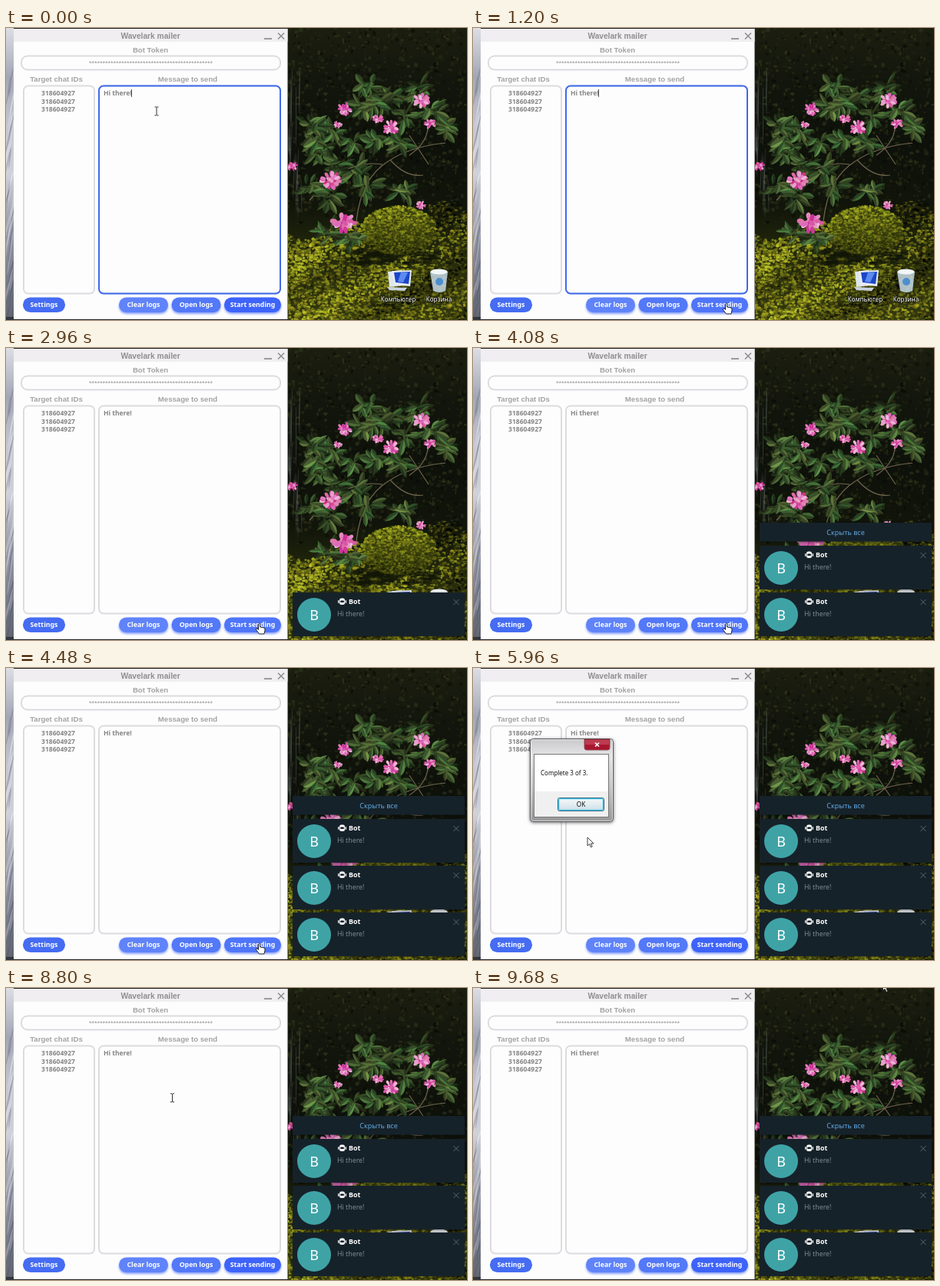
An HTML page with a canvas that plays this animation: 600 px wide and 381 px high, repeating every 9720 ms.

```html
<!DOCTYPE html>
<html lang="en">
<head>
<meta charset="utf-8">
<title>Mailer demo</title>
<style>
html, body { margin: 0; width: 100%; height: 100%; overflow: hidden; background: #0b0f09; }
canvas, svg { position: absolute; left: 0; top: 0; width: 600px; height: 381px; }
text { font-family: "Noto Sans", "Open Sans", sans-serif; white-space: pre; }
.head { font: bold 9.6px "Liberation Sans", Arial, sans-serif; fill: #a3a3a3; text-anchor: middle; }
.title { font-size: 10.2px; fill: #8f8f8f; }
.stars { font: 9px "Liberation Sans", Arial, sans-serif; fill: #999; text-anchor: middle; }
.body { font-size: 8.5px; font-weight: 600; fill: #858585; }
.btn { font-size: 8.75px; font-weight: 700; fill: #fff; text-anchor: middle; }
.icon { font-size: 8px; fill: #fff; text-anchor: middle; paint-order: stroke; stroke: #000a; stroke-width: 1.5px; }
.field { fill: #fefdfe; stroke: #dcdce0; stroke-width: 2; }
.mid { text-anchor: middle; }
</style>
</head>
<body>
<canvas id="wall" width="600" height="381"></canvas>
<svg viewBox="0 0 600 381">
  <defs>
    <filter id="glow" x="-20%" y="-40%" width="140%" height="200%">
      <feDropShadow dx="0" dy="2" stdDeviation="1.6" flood-color="#3f66f0" flood-opacity=".65"/>
    </filter>
    <filter id="shade" x="-10%" y="-20%" width="120%" height="140%">
      <feDropShadow dx="0" dy="1" stdDeviation="2" flood-opacity=".55"/>
    </filter>
    <linearGradient id="frame" x1="0" y1="0" x2="0" y2="1">
      <stop offset="0" stop-color="#c9c9cb"/><stop offset=".2" stop-color="#e4e4e6"/>
      <stop offset=".6" stop-color="#c4c4c6"/><stop offset="1" stop-color="#98989b"/>
    </linearGradient>
    <linearGradient id="ok" x1="0" y1="0" x2="0" y2="1">
      <stop offset="0" stop-color="#f4f8fa"/><stop offset=".5" stop-color="#e3edf2"/>
      <stop offset="1" stop-color="#cbdde5"/>
    </linearGradient>
    <g id="card">
      <rect x="373" y="319" width="224" height="57" fill="#17212b" filter="url(#shade)"/>
      <circle cx="401" cy="348" r="22" fill="#3fa3a6"/>
      <text x="401" y="354.5" class="mid" font-size="18" font-weight="500" fill="#fff">B</text>
      <g fill="#fff">
        <rect x="434" y="326.5" width="7" height="8.5" rx="2.5"/>
        <rect x="432" y="329" width="1.4" height="4" rx=".7"/>
        <rect x="441.6" y="329" width="1.4" height="4" rx=".7"/>
        <rect x="435" y="329.5" width="5" height="2.6" rx="1" fill="#17212b"/>
      </g>
      <text x="446" y="334" font-size="8.9" font-weight="700" fill="#fff">Bot</text>
      <text x="431" y="350" font-size="8.8" fill="#808b95">Hi there!</text>
      <path d="M582.5 328l7 7m0-7l-7 7" stroke="#5c6872"/>
    </g>
  </defs>

  <!-- desktop icons -->
  <g>
    <path d="M497 318l18-2 1 20-17 2z" fill="#dfe6ec"/>
    <path d="M502 317l26-1-2 21-21-2z" fill="#e9edf2"/>
    <path d="M505 319l21-1-2 16-17-2z" fill="#1c46c8"/>
    <path d="M514 319l9 0-6 13-7-1z" fill="#5c8bf0"/>
    <path d="M496 338l26 1-3 4-20-1z" fill="#c9d3dc"/>
    <path d="M552 318q11-6 23 0l-3 25q-8 4-16 0z" fill="#c8dbe6" opacity=".85"/>
    <ellipse cx="563.5" cy="318" rx="11" ry="3.5" fill="#f1f6f9"/>
    <circle cx="564" cy="331" r="5" fill="#4c8fd0"/>
    <text x="510.5" y="356.5" class="icon">Компьютер</text>
    <text x="563.5" y="356.5" class="icon">Корзина</text>
  </g>

  <!-- application window -->
  <rect x="10" width="357" height="381" fill="#222"/>
  <rect x="10" y="1" width="356.5" height="379" fill="#fefdfe"/>
  <rect x="10" y="1" width="356.5" height="17" fill="#f0eef0"/>
  <path d="M336 14h10" stroke="#777" stroke-width="1.4"/>
  <path d="M354 6.5l8 8m0-8l-8 8" stroke="#888" stroke-width="1.4"/>
  <text x="188" y="14" class="head title">Wavelark mailer</text>
  <text x="188" y="31.5" class="head">Bot Token</text>
  <rect x="20" y="36.5" width="337" height="18" rx="8" class="field"/>
  <text x="188.5" y="48.7" class="stars" id="stars"></text>
  <text x="65.5" y="69.5" class="head">Target chat IDs</text>
  <text x="236.5" y="70" class="head">Message to send</text>
  <rect x="23" y="75.5" width="92" height="271" rx="6" class="field"/>
  <rect x="121" y="75.5" width="236" height="271" rx="6" class="field"/>
  <rect id="focus" x="121" y="75.5" width="236" height="271" rx="6" fill="none" stroke="#3f6aeb" stroke-width="2"/>
  <text x="68" y="88" class="body mid">318604927</text>
  <text x="68" y="98.6" class="body mid">318604927</text>
  <text x="68" y="109.2" class="body mid">318604927</text>
  <text x="127" y="88" class="body">Hi there!</text>
  <path id="caret" d="M163.5 80v10" stroke="#555"/>
  <g id="buttons"></g>

  <!-- notifications -->
  <g id="hideAll">
    <rect x="373" width="224" height="24.5" fill="#17212b" filter="url(#shade)"/>
    <text x="485" y="15.6" class="mid" font-size="9" fill="#62a8e0">Скрыть все</text>
  </g>
  <use class="note" href="#card"/>
  <use class="note" href="#card"/>
  <use class="note" href="#card"/>

  <!-- result dialog -->
  <g id="dialog">
    <rect x="74.5" y="92.5" width="108" height="108" rx="4" fill="url(#frame)" stroke="#58585a" filter="url(#shade)"/>
    <rect x="75.5" y="93.5" width="106" height="106" rx="3" fill="none" stroke="#fff9"/>
    <path d="M145 93h33v11q0 3-3 3h-27q-3 0-3-3z" fill="#bd3a50" stroke="#6b2430" stroke-width=".7"/>
    <path d="M146 100h31v4q0 2-2 2h-27q-2 0-2-2z" fill="#a8162e"/>
    <path d="M159 97.5l5 5m0-5l-5 5" stroke="#fff" stroke-width="1.6"/>
    <rect x="79.5" y="112.5" width="97" height="82" fill="#fff" stroke="#777"/>
    <rect x="80" y="161" width="96" height="33" fill="#f0f0f0"/>
    <text x="88" y="140" font-size="8" fill="#111">Complete 3 of 3.</text>
    <rect id="okBox" x="110.5" y="169.5" width="60" height="17" rx="2" fill="url(#ok)" stroke="#35697f"/>
    <rect x="111.7" y="170.7" width="57.6" height="14.6" rx="1" fill="none" stroke="#43c1e4" stroke-width="1.3"/>
    <text x="140.5" y="181" class="mid" font-size="8.2" fill="#111">OK</text>
  </g>

  <g id="cursor">
    <path id="beam" d="M-2.5-5.5h2l.5.5.5-.5h2M0-5v10M-2.5 5.500h2l.5-.5.5.5h2" fill="none" stroke="#333"/>
    <path id="arrow" d="M0 0V11L2.6 8.600 4.400 12.800 6.200 12 4.500 8H8Z" fill="#fff" stroke="#111" stroke-width=".8"/>
    <path id="hand" d="M-1 1Q0-.8 1.200 1V5L6 6Q8 6.500 7.600 9L6.500 14H0L-4 8.500Q-4 6.500-2.600 7L-1 8.500Z" fill="#fff" stroke="#111" stroke-width=".9"/>
  </g>
</svg>
<script>
const $ = id => document.getElementById(id);
const LOOP = 9720, STEP = 40, CARD_GAP = 61;

let seed = 7;
const rnd = (lo, hi) => {
  seed = (seed * 16807) % 2147483647;
  return lo + (hi - lo) * seed / 2147483647;
};

function paintWall() {
  const c = $("wall").getContext("2d");
  const blob = (x, y, rx, ry, color, turn = 0) => {
    c.fillStyle = color;
    c.beginPath();
    c.ellipse(x, y, rx, ry, turn, 0, 7);
    c.fill();
  };
  const gradient = (y1, stops) => {
    const g = c.createLinearGradient(0, 0, 0, y1);
    stops.forEach((s, i) => g.addColorStop(i / (stops.length - 1), s));
    return g;
  };
  const leaf = (x, y, turn, len, wide, hue, light) => {
    c.save();
    c.translate(x, y);
    c.rotate(turn);
    c.fillStyle = `hsl(${hue},34%,${light}%)`;
    c.fill(new Path2D(`M0 0Q${len * .6} ${-wide} ${len} 0Q${len * .6} ${wide} 0 0`));
    c.fillStyle = `hsl(${hue},30%,${light * .65}%)`;
    c.fill(new Path2D(`M0 0Q${len * .6} ${wide} ${len} 0Z`));
    c.restore();
  };
  // waterfall strip on the left
  c.fillStyle = gradient(381, ["#dcdee4", "#a3a8b5", "#c3c6d0", "#d0d2da", "#9a9eab", "#7b8090", "#60656f"]);
  c.fillRect(0, 0, 11, 381);
  for (let i = 0; i < 40; i++)
    blob(rnd(0, 10), rnd(20, 375), .9, rnd(10, 30), rnd(0, 1) < .5 ? "#ffffff40" : "#4a506040", rnd(.1, .3));
  c.fillStyle = "#33363a";
  c.fillRect(0, 377, 11, 4);

  // dark forest
  c.save();
  c.beginPath();
  c.rect(366, 0, 234, 381);
  c.clip();
  c.fillStyle = gradient(381, ["#1c1e10", "#12150c", "#0d110a", "#10140a", "#262b0c", "#34380f"]);
  c.fillRect(366, 0, 234, 381);
  for (let i = 0; i < 1500; i++)
    blob(rnd(366, 600), rnd(0, 255), rnd(.7, 3), rnd(.7, 3), `hsla(${rnd(48, 90)},35%,${rnd(2, 18)}%,.6)`);
  for (let i = 0; i < 16; i++)
    blob(rnd(367, 385), rnd(50, 250), .6, rnd(15, 40), "#a9b6c238", rnd(-.05, .05));

  // moss slope, lit on the left, and the boulder
  for (let i = 0; i < 4200; i++) {
    const x = rnd(366, 600), top = 264 + 12 * Math.sin(x / 19) - (x > 550 ? 26 : 0);
    const y = rnd(top, 381), lit = Math.sin(x / 24 + y / 13) * 9 + (480 - x) / 16;
    blob(x, y, rnd(.8, 3), rnd(.7, 2), `hsla(${rnd(55, 68)},68%,${rnd(8, 42) + lit}%,.75)`);
  }
  for (let i = 0; i < 70; i++)
    blob(rnd(455, 560), rnd(290, 308), rnd(4, 10), rnd(1, 3), "#11150899");
  blob(511, 264, 49, 32, "#373d0c");
  for (let i = 0; i < 1200; i++) {
    const a = rnd(0, 6.28), r = Math.sqrt(rnd(0, 1)), dy = r * Math.sin(a);
    blob(511 + 49 * r * Math.cos(a), 264 + 32 * dy, rnd(.8, 2.4), rnd(.7, 1.7),
      `hsla(${rnd(57, 70)},68%,${rnd(12, 40) - 12 * dy}%,.7)`);
  }

  // branches
  c.strokeStyle = "#71664e";
  c.lineWidth = 1.2;
  c.stroke(new Path2D("M455 265Q458 205 489 180T572 150M395 225Q440 170 490 178M500 172Q520 195 543 192M549 130Q548 150 525 166M525 140L550 178"));

  // leaves radiate from the middle of each clump
  const clumps = [[470, 72], [503, 88], [424, 132], [452, 148], [482, 146], [522, 116], [462, 104],
    [555, 108], [572, 128], [408, 160], [430, 180], [518, 211], [470, 207], [402, 145],
    [421, 218], [397, 208], [450, 272], [420, 266], [400, 125], [535, 80], [455, 186], [508, 148], [484, 98]];
  for (const [x, y] of clumps)
    for (let i = 0; i < 18; i++)
      leaf(x + rnd(-7, 7), y + rnd(-6, 6), rnd(-.6, 3.8) + (i % 3 ? 0 : 3), rnd(13, 23), rnd(4, 8),
        rnd(82, 112), rnd(7, 24) + i * 1.2);

  // blossoms: x, y, radius
  const blossoms = [[540, 95, 13], [501, 130, 12], [484, 119, 8], [440, 106, 11], [372, 180, 8],
    [423, 199, 15], [439, 253, 18], [552, 125, 9], [540, 231, 7], [432, 126, 6]];
  for (const [x, y, r] of blossoms)
    for (let i = 0; i < 42; i++) {
      const a = rnd(0, 6.28), d = rnd(0, r * .78);
      blob(x + d * Math.cos(a), y + d * .8 * Math.sin(a), r * .25, r * .15, `hsl(${rnd(316, 332)},62%,${rnd(48, 84)}%)`, a);
    }
  c.restore();
}

// label, left, width, colour
const buttons = [["Settings", 22, 55, "#456cf2"], ["Clear logs", 147, 64, "#6083fa"],
  ["Open logs", 215.5, 64, "#5278f8"], ["Start sending", 284, 74, "#3d63f8"]];
$("buttons").innerHTML = buttons.map(([label, x, w, color], i) =>
  `<rect x="${x}" y="351.5" width="${w}" height="19.5" rx="9.7" fill="${color}" ${i ? 'filter="url(#glow)"' : ""}/>
   <text x="${x + w / 2}" y="364.3" class="btn">${label}</text>`).join("");
const sendBox = $("buttons").querySelectorAll("rect")[3];
$("stars").textContent = "*".repeat(46);

const ease = p => p * p * (3 - 2 * p);
const show = (el, alpha) => el.setAttribute("opacity", alpha);
const move = (el, x, y) => el.setAttribute("transform", `translate(${x} ${y})`);

// time, x, y of the pointer's hot spot
const path = [[160, 196, 108.5], [1160, 329.5, 359], [5560, 329.5, 359], [5960, 149, 221],
  [6200, 141.5, 179], [8520, 141.5, 179], [9520, 533.5, -7.5], [LOOP, 533.5, -7.5]];

function pointer(t) {
  if (t <= path[0][0]) return path[0].slice(1);
  const i = path.findIndex(p => t <= p[0]);
  const [t0, x0, y0] = path[i - 1], [t1, x1, y1] = path[i];
  const p = ease((t - t0) / (t1 - t0));
  return [x0 + (x1 - x0) * p, y0 + (y1 - y0) * p];
}

function pointerKind(x, y, modal) {
  if (modal) return "arrow";
  if (x > 121 && x < 357 && y > 75 && y < 347) return "beam";
  return x > 284 && x < 358 && y > 351 && y < 371 ? "hand" : "arrow";
}

function draw(t) {
  // progress of a change whose first altered picture is at a, last at b
  const ramp = (a, b) => Math.min(1, Math.max(0, (t - a + STEP) / (b - a + STEP)));

  show($("focus"), 1 - ramp(1520, 1760));
  show($("caret"), t < 480 || (t >= 960 && t < 1520) ? 1 : 0);

  const [x, y] = pointer(t);
  const kind = pointerKind(x, y, t >= 5600 && t < 7360);
  move($("cursor"), x, y);
  for (const k of ["beam", "arrow", "hand"]) show($(k), k === kind ? 1 : 0);

  const press = ramp(1520, 1640) - ramp(1760, 1920);
  const light = (kind === "hand" ? 18 : 0) - 30 * press;
  sendBox.setAttribute("fill", `rgb(${61 + light},${99 + light},250)`);

  const arrive = [ramp(2720, 2960), ramp(3400, 3640), ramp(4120, 4360)];
  const lift = arrive.map(ease);
  document.querySelectorAll(".note").forEach((note, i) => {
    const above = lift.slice(i + 1).reduce((a, b) => a + b, 0);
    show(note, arrive[i]);
    move(note, 0, 12 * (1 - lift[i]) - CARD_GAP * above);
  });
  show($("hideAll"), arrive[1]);
  move($("hideAll"), 0, 289 - CARD_GAP * (lift[1] + lift[2]));

  const open = ramp(4640, 4840) * (1 - ramp(7240, 7360)), scale = .92 + .08 * open;
  show($("dialog"), open);
  $("dialog").setAttribute("transform", `translate(128.5 146.5) scale(${scale}) translate(-128.5 -146.5)`);
  const hit = ramp(6680, 6720) - ramp(6800, 6840);
  $("okBox").setAttribute("fill", hit > 0 ? "#b9dcea" : "url(#ok)");
}

function tick() {
  const t = performance.now() % LOOP;
  draw(Math.floor(t / STEP) * STEP);
  requestAnimationFrame(tick);
}

paintWall();
tick();
</script>
</body>
</html>
```
